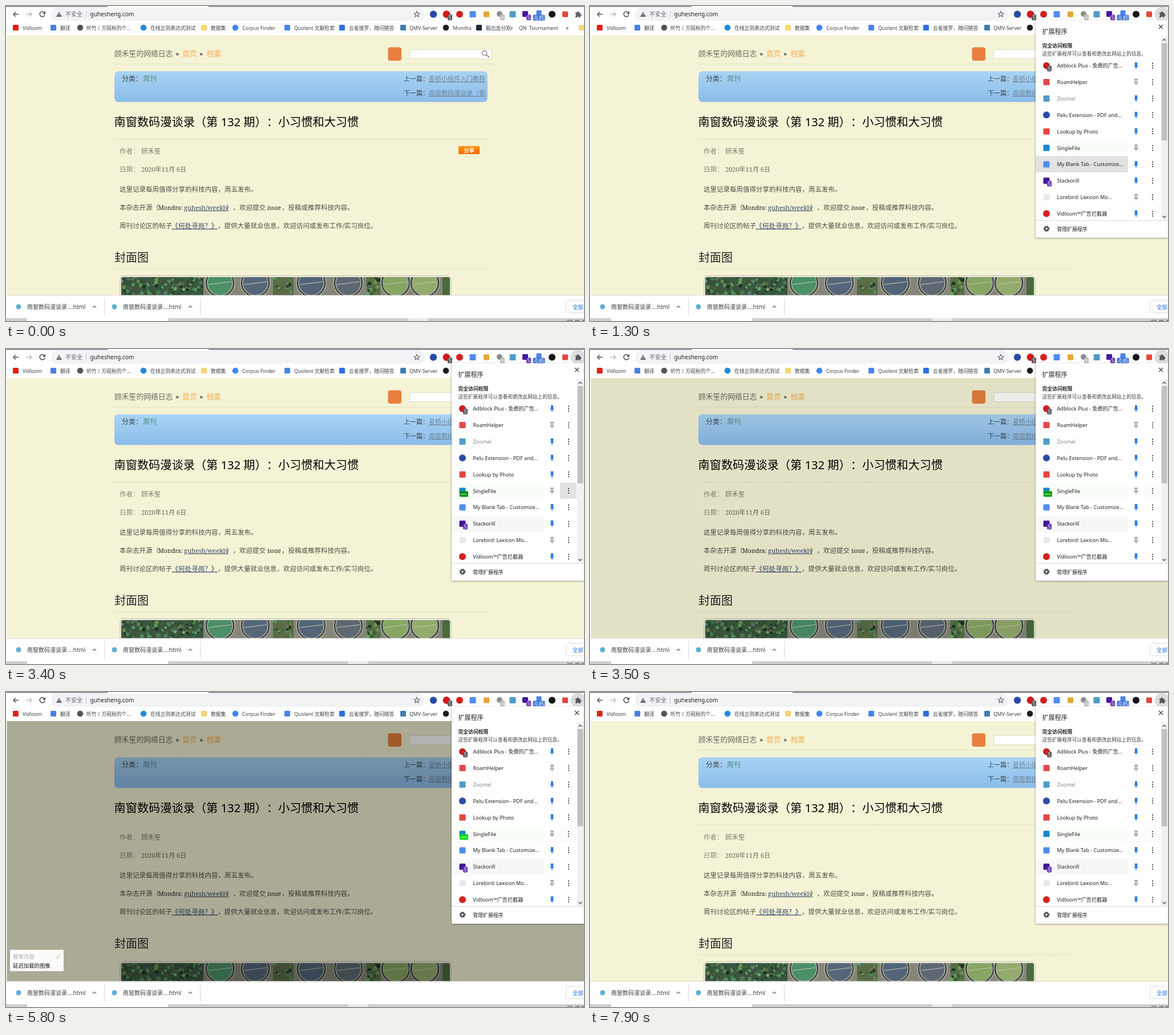
Recreate the animation shown at these times as an HTML page. Size 1013 by 553 pixels, loop 8 s.

```html
<!DOCTYPE html>
<html lang="zh-CN">
<head>
<meta charset="utf-8">
<title>网络日志</title>
<style>
html, body { margin: 0; width: 100%; height: 100%; overflow: hidden; background: #fff; }
svg { display: block; width: 100vw; height: 100vh; }
text { white-space: pre; text-spacing-trim: space-all; font-feature-settings: "chws" 0, "halt" 0; }
.ui { font-family: "Noto Sans", "Noto Sans CJK SC", "Noto Sans CJK", sans-serif; }
.page { font-family: "Noto Serif", "Noto Sans CJK SC", "Noto Sans CJK", serif; font-weight: 300; }
</style>
</head>
<body>
<svg id="stage" viewBox="0 0 1013 553" preserveAspectRatio="none"></svg>
<script>
const LOOP = 8000;
const stage = document.getElementById('stage');

// Markup helpers
const rect = (x, y, w, h, fill, more = '') =>
  `<rect x="${x}" y="${y}" width="${w}" height="${h}" fill="${fill}" ${more}/>`;
const disc = (x, y, r, fill, more = '') =>
  `<circle cx="${x}" cy="${y}" r="${r}" fill="${fill}" ${more}/>`;
const path = (d, color, width = 1.3, more = '') =>
  `<path d="${d}" fill="none" stroke="${color}" stroke-width="${width}" ${more}/>`;
const shape = (d, fill, more = '') => `<path d="${d}" fill="${fill}" ${more}/>`;
const text = (x, y, size, fill, str, more = '') =>
  `<text x="${x}" y="${y}" font-size="${size}" fill="${fill}" ${more}>${str}</text>`;
const square = (x, y, s, fill) => rect(x - s / 2, y - s / 2, s, s, fill, 'rx="1.5"');
const group = (id, body, more = '') => `<g id="${id}" ${more}>${body}</g>`;
const badge = (x, y, w, fill, str) =>
  rect(x - w / 2, y - 5, w, 10, fill, 'rx="2"') +
  text(x, y + 3, 8, '#fff', str, 'text-anchor="middle"');

let seed = 7;
const rand = () => (seed = (seed * 16807) % 2147483647) / 2147483647;

const WEEKLY = '南窗数码漫谈录';
const AUTHOR = '顾禾笙';

function toolbar() {
  const star = Array.from({ length: 10 }, (_, i) => {
    const r = i % 2 ? 2.2 : 5.2, a = i * Math.PI / 5;
    return `${720 + r * Math.sin(a)} ${14.5 - r * Math.cos(a)}`;
  }).join('L');
  let s = rect(0, 0, 1013, 51, '#fff') +
    rect(0, 0, 178, 1.6, '#85898d') + rect(355, 0, 658, 1.6, '#85898d') +
    rect(79, 3, 655, 23, '#f1f3f4', 'rx="11.5"') +
    path('M22 14.5H13M17 10.5L13 14.5L17 18.5', '#4b4f53', 1.4) +
    path('M35 14.5H45M41 10.5L45 14.5L41 18.5', '#b9bbbe', 1.4) +
    path('M67.5 12A4.5 4.5 0 1 0 68 15.5', '#4b4f53', 1.5) +
    shape('M69 9v5h-5z', '#4b4f53') +
    shape('M93 10l5 9h-10z', '#5f6368') + rect(92.5, 13, 1, 3, '#fff') + rect(92.5, 17, 1, 1, '#fff') +
    text(104, 18, 10, '#5f6368', '不安全') + rect(140, 9, 1, 11, '#c4c7ca') +
    text(147.5, 18, 10.1, '#202124', 'guhesheng.com') +
    path('M' + star + 'Z', '#5f6368', 1.1);

  s += disc(749, 14.5, 6.2, '#2a4ba5') +
    disc(772, 14.5, 6.5, '#cf1c1c') + badge(778, 20, 8, '#555', '5') +
    disc(795, 14.5, 6, '#d2201f') + square(818, 14.5, 11, '#4f8df0') +
    square(842, 14.5, 10, '#e2a72e') +
    disc(865, 14, 5, '#8c8c8c') + badge(870, 20, 8, '#bdbdbd', 'x') +
    square(888, 14.5, 11, '#4f9cc9') +
    square(910, 14, 10, '#42189b') + badge(916, 20, 8, '#6a35b5', '5') +
    square(934, 12, 9, '#4a83e8') + badge(934, 20.5, 21, '#4177d8', '-0.85') +
    disc(957, 14.5, 6, '#151515') + square(980, 14.5, 10, '#e2483d') +
    disc(1002.5, 14.5, 13, '#dedede', 'id="press"') +
    shape('M998 11.5h2.7a1.7 1.7 0 1 1 3.3 0h2.5v2.7a1.7 1.7 0 1 1 0 3.3v2.5h-2.7a1.6 1.6 0 0 0-3.2 0H998v-2.8a1.6 1.6 0 0 0 0-3z', '#5a5e62', 'id="puzzle"');

  const marks = [
    [17, '#e3201b', 29, 'Vidloom'], [83, '#4a80e0', 95, '翻译'],
    [130, '#555', 141, '听竹丨方砚秋的个...'], [241, '#2787d6', 253, '在线正则表达式测试'],
    [347, '#f6d66f', 359, '数据集'], [402, '#4285f4', 414, 'Corpus Finder'],
    [493, '#4d83e6', 505, 'Quolent 文献检索'], [589, '#2f6ede', 601, '云雀搜罗，随问随答'],
    [696, '#3d7fae', 707, 'QMV-Server'], [771, '#1d1d1d', 783, 'Mondra'],
    [829, '#1e2a38', 841, '脑出血分割r']
  ];
  marks.forEach(([ix, color, tx, label], i) => {
    s += [2, 3, 5, 9].includes(i) ? disc(ix, 38, 5.3, color) : square(ix, 38, 10, color);
    s += text(tx, 41.5, 8.8, '#3c4043', label);
  });
  return s + text(899, 41.5, 8.8, '#3c4043', 'QN') + text(917, 41.5, 8.8, '#3c4043', 'Tournament') +
    text(981, 41.5, 10, '#3c4043', '»') + square(1009, 38, 10, '#f6d66f');
}

function photo() {
  let s = rect(202, 476, 576, 33, '#85857a') + rect(202, 476, 144, 33, '#3a5640') +
    rect(468, 476, 36, 33, '#5a6c46') + rect(632, 476, 24, 33, '#54703f') + rect(765, 476, 14, 33, '#4a6a3c');
  for (let i = 0; i < 190; i++) {
    const x = i < 140 ? 202 + rand() * 142 : i < 168 ? 470 + rand() * 32 : 632 + rand() * 24;
    s += disc(x.toFixed(1), (476 + rand() * 32).toFixed(1), (1 + rand() * 2.5).toFixed(1),
      `hsl(${85 + rand() * 65 | 0} ${15 + rand() * 20 | 0}% ${14 + rand() * 40 | 0}%)`);
  }
  [[375, '#4b9068'], [437, '#56667a'], [535, '#536479'], [600, '#5d6872'], [683, '#86a662'], [734, '#93ab6c']]
    .forEach(([x, fill]) => {
      s += disc(x, 486, 26, '#3c4643', 'stroke="#b3b09e" stroke-width="1.5"') +
        disc(x, 486, 22, fill, 'stroke="#aeb09f" stroke-width="1.5"') +
        path(`M${x - 20} 489L${x + 20} 484`, '#c5c3b2', 1.2);
    });
  return `<g clip-path="url(#photoClip)">${s}</g>`;
}

function page() {
  const INK = '#4c4b43';
  const body = (y, parts) => parts.map(([x, str, more, size]) =>
    text(x, y, size || 11.5, INK, str, more)).join('');
  const rule = (y, x2) => path(`M190 ${y}H${x2}`, '#d3d1b8', 1, 'stroke-dasharray="1.5 1"');
  const under = 'text-decoration="underline"';
  const link = under + ' style="fill:#34466a"';
  const dark = 'style="fill:#222" font-weight="400"';
  return rect(1.5, 51, 1012, 457, '#f5f3d5') +
    text(190, 88, 12.8, '#6a6a60', AUTHOR + '的网络日志') +
    text(297, 88, 12.8, '#222', '»') + text(309, 88, 12.8, '#f3ad52', '首页') +
    text(339, 88, 12.8, '#222', '»') + text(351.5, 88, 12.8, '#f3ad52', '档案') +
    rect(669.5, 72.5, 23.5, 23.5, '#e87f3c', 'rx="4"') +
    rect(707.5, 76.5, 143, 16, '#fff', 'stroke="#dedcc8"') +
    disc(838.5, 82.5, 4, 'none', 'stroke="#888" stroke-width="1.5"') +
    path('M841.5 85.5L847 90', '#888', 2) +
    group('rules', rule(102, 858) + rule(233.5, 844) + rule(461, 844)) +
    rect(190, 114.5, 654, 54, 'url(#sky)', 'rx="7"') +
    text(203, 132, 12, '#3a4650', '分类：') + text(240, 132, 12, '#4a8a86', '周刊') +
    text(697, 132, 11, '#3a4650', '上一篇：') + text(741, 132, 11, '#72879a', '星桥小组件入门教程', under) +
    text(697, 157, 11, '#3a4650', '下一篇：') + text(741, 157, 11, '#72879a', WEEKLY + '（第', under) +
    text(189.5, 211, 20.2, '#000', WEEKLY + '（第 132 期）：小习惯和大习惯', 'class="ui" font-weight="400"') +
    text(199, 259, 11.5, '#8a8a7c', '作者：') + text(237, 259, 11.5, '#7c7c70', AUTHOR) +
    text(199, 291, 11.5, '#8a8a7c', '日期：') + text(237, 291, 11, '#66665c', '2020年11月 6日') +
    rect(793, 246, 37, 14, 'url(#orange)', 'rx="1"') +
    text(811.5, 256.5, 9.5, '#fff', '分享', 'class="ui" font-weight="700" text-anchor="middle"') +
    body(326, [[199, '这里记录每周值得分享的科技内容，周五发布。']]) +
    body(358, [[199, '本杂志开源（'], [267, 'Mondra:', dark, 10.5], [312, 'guhesh/weekly', link, 11],
      [386, '），欢迎提交'], [458, 'issue', dark, 10], [483, '，投稿或推荐科技内容。']]) +
    body(390, [[199, '周刊讨论区的帖子'], [290.5, '《何处寻岗？》', link],
      [371, '，提供大量就业信息，欢迎访问或发布工作/实习岗位。']]) +
    text(190, 449, 20, '#222', '封面图') +
    rect(199.5, 473, 581, 50, '#e6e5d4', 'rx="8" stroke="#cfcdb8"') + photo() +
    rect(1.5, 51, 1012, 457, '#000', 'id="dim"');
}

function downloads() {
  const item = x => disc(x + 22, 528, 4.5, '#5fb0d0') +
    text(x + 37, 531.5, 10, '#3c4043', WEEKLY + '....html') +
    path(`M${x + 152} 529.5l3-3l3 3`, '#5f6368', 1.2) + rect(x + 172, 513, 1, 31, '#d5d7da');
  return rect(0, 508, 1013, 40, '#fff') + rect(0, 507.5, 1013, 1, '#dcdcd8') + item(0) + item(168) +
    rect(981.5, 516.5, 60, 22, '#fff', 'rx="3" stroke="#dadce0"') +
    text(993, 531.5, 9.5, '#1a73e8', '全部显示') +
    rect(0, 548, 1013, 5, '#cfcfcf') + rect(37, 548, 247, 5, '#fff') +
    rect(705, 548, 35, 5, '#ebebeb', 'id="task"') + text(983, 558, 9, '#222', '', 'id="clock"');
}

function panel() {
  const rows = [
    ['Adblock Plus - 免费的广告...', '#c81f1f', 1], ['RoamHelper', '#e0484c', 0], ['Zoomel', '#4f9cc9', 1],
    ['Pelu Extension - PDF and...', '#2a4ba5', 1], ['Lookup by Photo', '#e2483d', 1], ['SingleFile', '#1b86cf', 0],
    ['My Blank Tab - Customize...', '#4f8df0', 1], ['Stackorill', '#42189b', 1],
    ['Lorebird: Lexicon Mo...', '#e9e9e9', 0], ['Vidloom™广告拦截器', '#d2201f', 1]
  ];
  let s = rect(781, 25, 231.5, 381.5, '#fff', 'filter="url(#shadow)"') +
    text(792.5, 49, 11, '#202124', '扩展程序') +
    path('M997 33l7 7M1004 33l-7 7', '#3c4043', 1.3) +
    text(792.5, 72.5, 8.8, '#202124', '完全访问权限', 'font-weight="700"') +
    text(792.5, 86.5, 8.7, '#3c4043', '这些扩展程序可以查看和更改此网站上的信息。') +
    rect(781, 235, 162, 28, '#f9fff8') +
    rect(781, 263.5, 162, 28.5, '#e2e2e2', 'id="hoverTab"') +
    rect(781, 292.5, 162, 28.5, '#f8f8f8', 'id="hoverStack"') +
    rect(971, 234.5, 29, 28.5, '#e2e2e2', 'id="hoverMore"');
  rows.forEach(([label, color, pinned], i) => {
    const y = 104.7 + i * 28.87;
    s += [0, 3, 9].includes(i) ? disc(800, y, 6, color) : square(800, y, 11, color);
    if (i === 0) s += badge(805, y + 5, 8, '#555', '5');
    if (i === 7) s += badge(805, y + 5, 8, '#6a35b5', '5');
    s += text(818.5, y + 3.5, 9.1, i === 2 ? '#80868b' : '#202124', label);
    const pin = `M954.5 ${y - 5}h5M955.5 ${y - 5}v5l-1.5 1.5h6l-1.5-1.5v-5M957 ${y + 1.5}v4`;
    s += pinned ? shape(pin + 'z', '#1a73e8', 'stroke="#1a73e8"') : path(pin, '#5f6368', 1);
    for (const dy of [-4, 0, 4]) s += disc(986, y + dy, 1.15, '#3c4043');
  });
  s += group('saving', rect(795, 249.5, 15, 10, '#0a8a12', 'rx="1.5" id="savingBg"') +
    [799, 802.5, 806].map(x => disc(x, 255, 1.1, '#fff')).join(''));
  s += rect(1001, 53, 11.5, 323, '#f1f1f1') + rect(1001.5, 65, 10, 171, '#c1c1c1') +
    path('M1003.5 61l3-3l3 3M1003.5 368.5l3 3l3-3', '#505050', 1.3) +
    rect(781, 376, 231.5, 30.5, '#fff') + rect(781, 376, 231.5, 1, '#dadce0') +
    disc(800, 391, 3, 'none', 'stroke="#4b4f53" stroke-width="2.5"') +
    disc(800, 391, 4.7, 'none', 'stroke="#4b4f53" stroke-width="1.5" stroke-dasharray="1.85"') +
    text(818.5, 394.5, 8.8, '#202124', '管理扩展程序');
  return s;
}

stage.innerHTML = `<defs>
  <linearGradient id="sky" x2="0" y2="1"><stop stop-color="#a9d3f2"/><stop offset="1" stop-color="#8bbcea"/></linearGradient>
  <linearGradient id="orange" x2="0" y2="1"><stop stop-color="#ff9416"/><stop offset="1" stop-color="#fb6800"/></linearGradient>
  <clipPath id="photoClip"><rect x="202" y="476" width="576" height="40" rx="4"/></clipPath>
  <filter id="shadow" x="-5%" y="-5%" width="110%" height="110%"><feDropShadow dx="0" dy="1" stdDeviation="1.5" flood-opacity=".5"/></filter>
  </defs>` +
  rect(0, 0, 1013, 553, '#fff') +
  group('site', page(), 'class="page"') +
  group('status', rect(2, 52, 73, 5, '#dcdcd2')) +
  group('progress', '', 'class="ui"') +
  group('bar', toolbar(), 'class="ui"') +
  group('shelf', downloads(), 'class="ui"') +
  group('panel', panel(), 'class="ui"');

const $ = id => document.getElementById(id);
const show = (id, on) => $(id).setAttribute('visibility', on ? 'inherit' : 'hidden');
const set = (id, name, value) => $(id).setAttribute(name, value);
const ramp = (t, from, to) => Math.min(1, Math.max(0, (t - from) / (to - from)));

// label, time it appears, time it is done
const steps = [
  ['框架内容', 3700, 4100], ['延迟加载的图像', 3700, 7000], ['步骤 1 / 3', 7100, 7400],
  ['步骤 2 / 3', 7500, 7700], ['步骤 3 / 3', 7600, 9000]
];

function progress(t) {
  const list = steps.filter(s => t >= s[1]);
  if (!list.length || t >= 7900) return '';
  const gap = 15.7, top = 484 - gap * list.length;
  const faint = (t >= 4800 && t < 5000) || (t >= 5800 && t < 6800);
  return rect(7, top, 94, 490 - top, '#fff', 'opacity=".96"') +
    list.map(([label, , done], i) => {
      const y = 480 - gap * (list.length - 1 - i);
      const k = ramp(t, done, done + 200);
      const c = Math.round(20 + 145 * k);
      const mark = k > 0
        ? path(`M88.5 ${y + 0.5}l2 3l4-7`, '#999', 0.9, `opacity="${0.4 + 0.6 * k}"`)
        : [88.5, 91.5, 94.5].map((x, j) =>
          disc(x, y + 1.5, 0.6, '#8c8c8c', `opacity="${faint && j < 2 ? 0.6 : 0.9}"`)).join('');
      return text(12, y + 3.5, 9.4, `rgb(${c},${c},${c})`, label) + mark;
    }).join('');
}

function update(now) {
  const t = Math.floor((now % LOOP) / 100) * 100;
  show('panel', t >= 800);
  set('panel', 'opacity', ramp(t, 700, 1000));
  show('press', t >= 800);
  set('puzzle', 'fill', t < 500 ? '#5f6368' : '#55595d');
  set('task', 'x', t < 800 ? 705 : 600);

  show('hoverTab', t >= 1200 && t < 1700);
  show('hoverStack', t >= 1700);
  set('hoverStack', 'fill', t < 1800 ? '#e2e2e2' : '#f8f8f8');
  show('hoverMore', t >= 2300);
  set('hoverMore', 'fill', t < 3500 ? '#e2e2e2' : '#fbfbfb');

  show('saving', t >= 3300 && t < 7500);
  const glow = ramp(t, 3400, 3800);
  set('savingBg', 'fill', `rgb(${10 - 6 * glow},${138 + 82 * glow},${18 + 10 * glow})`);

  const dim = t < 7900 ? glow : 0;
  set('dim', 'opacity', 0.3 * dim);
  set('rules', 'opacity', 1 - 0.8 * dim);
  show('status', t >= 7700 && t < 7900);
  $('progress').innerHTML = progress(t);
  $('clock').textContent = '15:45:' + Math.floor(47.5 + t / 1000);
}

const start = performance.now();
function tick() {
  update(performance.now() - start);
  requestAnimationFrame(tick);
}
tick();
</script>
</body>
</html>
```
